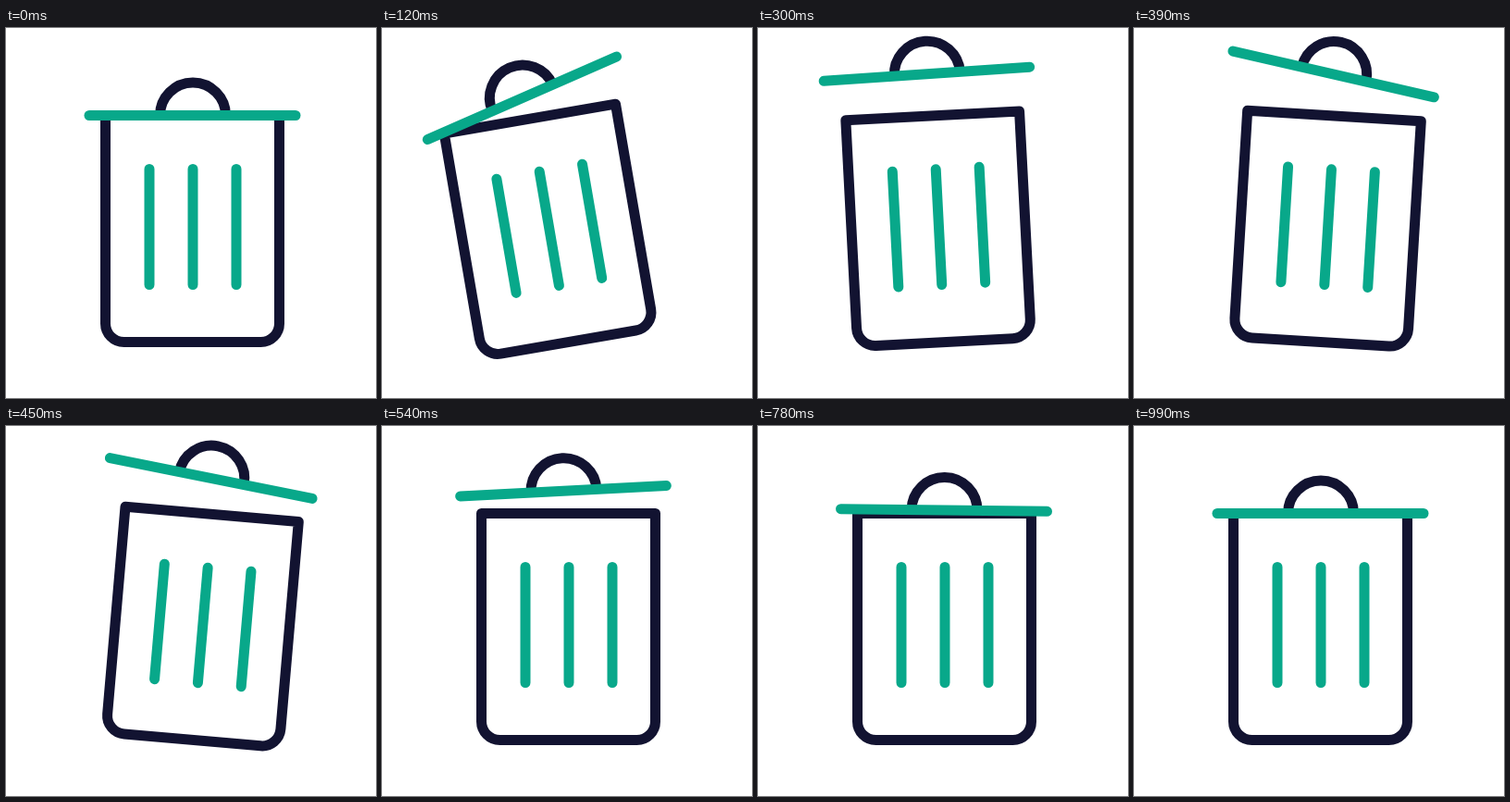
An HTML page that plays this animation: 400x400 px, repeating every 3020 ms.

```html
<!DOCTYPE html>
<html lang="en">
<head>
<meta charset="utf-8">
<title>Trash bin</title>
<style>
  html, body { margin: 0; width: 100%; height: 100%; overflow: hidden; background: #fff; }
  svg { display: block; width: 100%; height: 100%; }
  path { fill: none; stroke-width: 11; stroke-linecap: round; stroke-linejoin: round; }
  .navy { stroke: #121331; }
  .green { stroke: #08a88a; }
</style>
</head>
<body>
<svg viewBox="0 0 400 400">
  <g id="bin">
    <path class="navy" d="M107.5 94.5H295.5V319.5a20 20 0 0 1-20 20H127.5a20 20 0 0 1-20-20Z"/>
    <path class="green" d="M155 152.5v125M202 152.5v125M249 152.5v125"/>
    <g id="lid">
      <path class="navy" style="stroke-linecap: butt" d="M166.5 94.5a35.5 35.5 0 0 1 71 0"/>
      <path class="green" d="M90 94.5H313"/>
    </g>
  </g>
</svg>
<script>
const LOOP = 3020, STEP = 30, LAST = 33;
const bin = document.getElementById('bin');
const lid = document.getElementById('lid');

// Keys are [step, value]; times are counted in steps of 30 ms.
const lidTurn = [[0, 0], [4, -13.9], [5.6, -16], [8, -9.2], [13.4, 9.6], [18, -2.95],
                 [19.5, -3.6], [26, 0.7], [27, 0.75], [33, 0]];
const lidShift = [[0, 0], [4, -4.5], [8, -4.2], [13, -3.6], [18, -5.5], [26, -0.5], [33, 0]];
const lidFall = [[12, -47], [18, -24.3], [26, -3.5], [33, 0]];

const smooth = u => u * u * (3 - 2 * u);
const mix = (a, b, u) => a + (b - a) * u;

// Smooth curve through the keys, flat at every turning point.
function curve(keys, n) {
  const slope = i => (keys[i + 1][1] - keys[i][1]) / (keys[i + 1][0] - keys[i][0]);
  const tangent = i => {
    if (i === 0) return slope(0);
    if (i === keys.length - 1) return 0;
    const a = slope(i - 1), b = slope(i);
    return a * b <= 0 ? 0 : 2 * a * b / (a + b);
  };
  let i = 0;
  while (i < keys.length - 2 && n >= keys[i + 1][0]) i++;
  const [t0, v0] = keys[i], [t1, v1] = keys[i + 1];
  const d = t1 - t0, u = (n - t0) / d;
  return mix(v0, v1, smooth(u))
    + d * u * (1 - u) * ((1 - u) * tangent(i) - u * tangent(i + 1));
}

function binTurn(n) {
  if (n < 5.6) return -10 * (1 - (1 - n / 5.6) ** 3);
  if (n < 14.8) return mix(-10, 5, smooth((n - 5.6) / 9.2));
  return n < 18 ? mix(5, 0, smooth((n - 14.8) / 3.2)) : 0;
}

function lidLift(n) {
  return n < 12 ? -47 * Math.sin(n / 12 * Math.PI / 2) : fall(n);
}

function fall(n) {
  const [[t0, v0], [t1, v1]] = lidFall;
  return n < t1 ? mix(v0, v1, 1 - (1 - (n - t0) / (t1 - t0)) ** 1) * 1 + ease(n, t0, t1)
                : curve(lidFall, n);
}

// Rounds the top of the lid's path so that it leaves its peak gently.
function ease(n, start, end) {
  const u = (n - start) / (end - start);
  return -12 * u * (1 - u);
}

function draw(ms) {
  const n = Math.min(LAST, Math.floor(ms % LOOP / STEP));
  bin.setAttribute('transform', `rotate(${binTurn(n)} 202 340)`);
  lid.setAttribute('transform',
    `translate(${curve(lidShift, n)} ${lidLift(n)}) rotate(${curve(lidTurn, n)} 201.5 94.5)`);
}

const start = performance.now();
function tick() {
  draw(performance.now() - start);
  requestAnimationFrame(tick);
}
draw(0);
requestAnimationFrame(tick);
</script>
</body>
</html>
```
